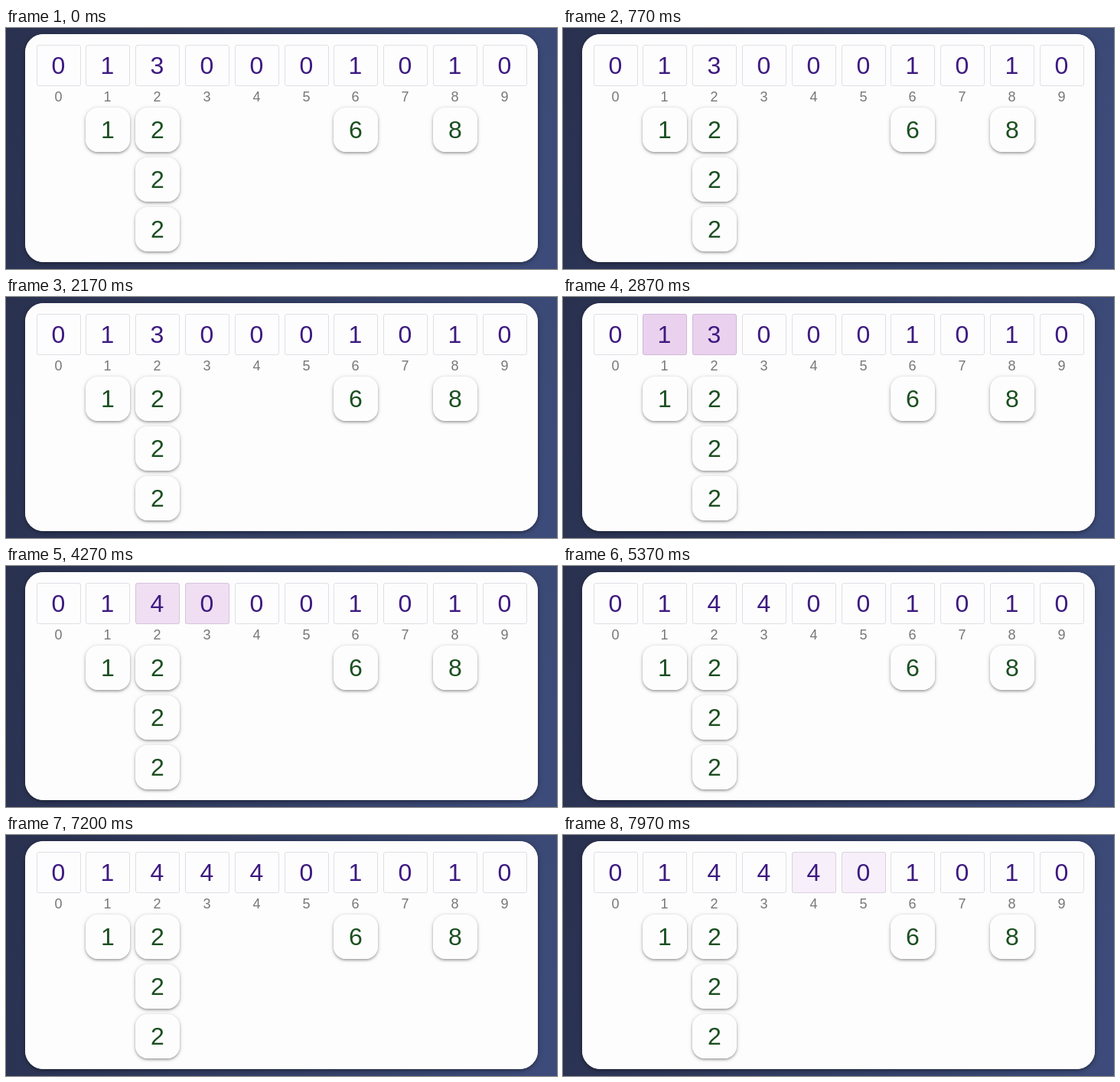
An HTML page with a canvas for the animation above (8 s loop, 720 px wide and 315 px high).

```html
<!DOCTYPE html>
<html lang="en">
<head>
<meta charset="utf-8">
<title>Counting sort: running totals</title>
<style>
  html, body { margin: 0; width: 100%; height: 100%; overflow: hidden; background: #323d63; }
  canvas { display: block; width: 720px; height: 315px; }
</style>
</head>
<body>
<canvas id="stage" width="720" height="315"></canvas>
<script>
const ctx = document.getElementById('stage').getContext('2d');

const LOOP = 8000;
const FIRST = 820;    // start of the first addition
const STEP = 1655;    // time between additions
const FADE = 300;     // highlight fades in, then out
const SIZE = 58;
const COUNTS = [0, 1, 3, 0, 0, 0, 1, 0, 1, 0];
const PAPER = [254, 253, 254];
const LILAC = [225, 190, 231];
const TILES = [[1, 0], [2, 0], [2, 1], [2, 2], [6, 0], [8, 0]];

const columnX = i => Math.round(39.6 + 64.8 * i);
const rowY = r => Math.round(104 + 64.8 * r);
const rgb = c => `rgb(${c.map(Math.round).join(',')})`;
const mix = (a, b, k) => a.map((v, i) => v + (b[i] - v) * k);

function roundBox(x, y, w, h, r, fill) {
  ctx.beginPath();
  ctx.roundRect(x, y, w, h, r);
  ctx.fillStyle = fill;
  ctx.fill();
}

function shadowBox(x, y, w, h, r, shadows) {
  ctx.save();
  for (const [dy, blur, alpha] of shadows) {
    ctx.shadowColor = `rgba(0,0,0,${alpha})`;
    ctx.shadowOffsetY = dy;
    ctx.shadowBlur = blur;
    roundBox(x, y, w, h, r, rgb(PAPER));
  }
  ctx.restore();
}

function label(text, x, y, size, color) {
  ctx.font = `${size}px "Liberation Sans", Arial, sans-serif`;
  ctx.textAlign = 'center';
  ctx.fillStyle = color;
  ctx.fillText(text, x, y);
}

// Highlight strength and counts at time t
function stateAt(t) {
  const counts = COUNTS.slice();
  const glow = counts.map(() => 0);
  for (let k = 0; FIRST + k * STEP < t; k++) {
    const age = t - FIRST - k * STEP;
    const level = Math.max(0, 1 - Math.abs(age - FADE) / FADE);
    glow[k] = Math.max(glow[k], level);
    glow[k + 1] = level;
    if (age >= 2 * FADE) counts[k + 1] += counts[k];
  }
  return { counts, glow };
}

function drawBackdrop() {
  const g = ctx.createLinearGradient(0, 0, 720, 160);
  g.addColorStop(0, '#29314f');
  g.addColorStop(1, '#3c4b79');
  ctx.fillStyle = g;
  ctx.fillRect(0, 0, 720, 315);
  shadowBox(25, 8, 670, 298, 24, [[2, 4, 0.25], [1, 8, 0.2]]);
}

function drawCell(i, count, glow) {
  const x = columnX(i);
  roundBox(x, 22, SIZE, 54, 3, rgb(mix(PAPER, LILAC, glow)));
  ctx.beginPath();
  ctx.roundRect(x + 0.5, 22.5, SIZE - 1, 53, 2.5);
  ctx.lineWidth = 1;
  ctx.strokeStyle = 'rgba(30,20,60,0.13)';
  ctx.stroke();
  label(count, x + 28.5, 60, 32, '#3d1a80');
  label(i, x + 28.5, 96, 18, '#777777');
}

function drawTile(column, row) {
  const x = columnX(column), y = rowY(row);
  shadowBox(x, y, SIZE, SIZE, 16, [[2, 3, 0.24], [1, 5, 0.2]]);
  label(column, x + 29, y + 40, 32, '#1b4f20');
}

function frame(now) {
  const { counts, glow } = stateAt(now % LOOP);
  drawBackdrop();
  counts.forEach((count, i) => drawCell(i, count, glow[i]));
  TILES.forEach(([column, row]) => drawTile(column, row));
}

const begin = performance.now();
function tick() {
  frame(performance.now() - begin);
  requestAnimationFrame(tick);
}
tick();
</script>
</body>
</html>
```
